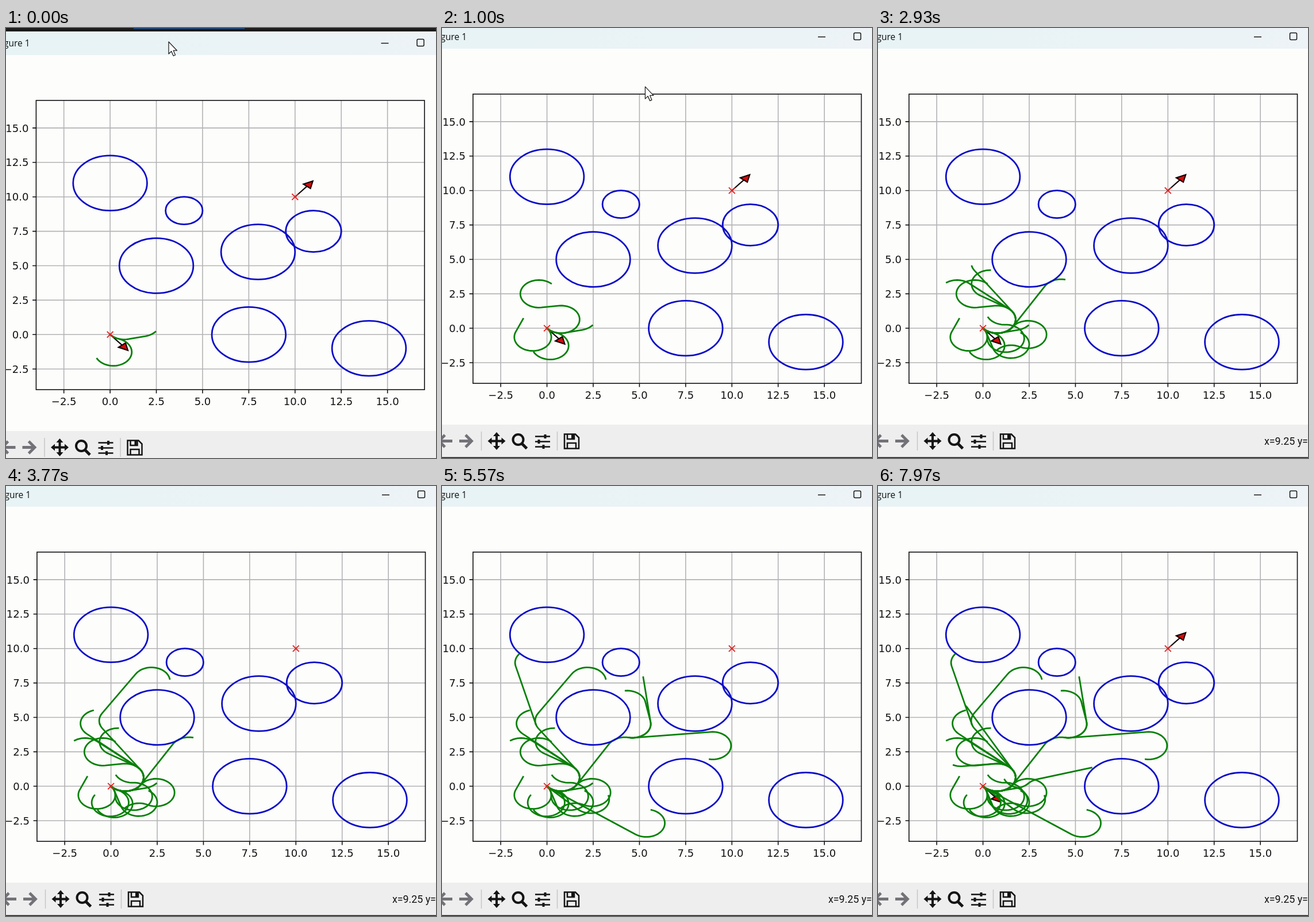
Write an HTML page that moves like this. It is 748x748 px and loops after 8 s.

```html
<!DOCTYPE html>
<html lang="en">
<head>
<meta charset="utf-8">
<title>Curved path planner</title>
<style>
  html, body { margin: 0; width: 100%; height: 100%; overflow: hidden; background: #1b1b1b; }
  svg { display: block; width: 100vw; height: 100vh; }
  .caption { font: 15.5px "Open Sans", sans-serif; fill: #111; text-anchor: end; }
  .readout { font: 17.8px Roboto, sans-serif; fill: #111; }
  .tick { font: 18px "DejaVu Sans", sans-serif; fill: #111; }
  .grid { stroke: #b3b3b5; stroke-width: 1.6; }
  .axis { stroke: #111; stroke-width: 1.6; fill: none; }
  .obstacle { fill: none; stroke: #0d0dc8; stroke-width: 2.8; }
  .edge { fill: none; stroke: #078007; stroke-width: 2.8; stroke-linejoin: round; stroke-linecap: square; }
  .mark { stroke: #f01c1c; stroke-width: 1.9; }
  .arrow { fill: #d90808; stroke: #100; stroke-width: 2.1; }
  .icon { fill: none; stroke: #141414; }
</style>
</head>
<body>
<svg viewBox="0 0 748 748">
  <defs>
    <linearGradient id="bar">
      <stop offset="0" stop-color="#e7f3f5"/><stop offset="1" stop-color="#edf3f7"/>
    </linearGradient>
  </defs>
  <rect width="748" height="748" fill="#1b1b1b"/>
  <rect x="222" width="193" height="1.5" fill="#1d4f91"/>
  <g id="win">
    <rect x="-10" y="-5" width="770" height="42" fill="url(#bar)"/>
    <rect x="-10" y="36" width="770" height="654" fill="#fdfdfc"/>
    <rect x="-10" y="690" width="770" height="56.5" fill="#eeeeee"/>
    <text class="caption" x="43" y="20.5">Figure 1</text>
    <path class="icon" stroke-width="1.5" d="M654 15.5h13"/>
    <rect class="icon" stroke-width="1.5" x="716.5" y="8.5" width="12" height="12" rx="2"/>

    <g id="grid"></g>
    <g id="arrows"></g>
    <g id="edges"></g>
    <g id="obstacles"></g>
    <g id="marks"></g>
    <g id="axes"></g>

    <g class="icon">
      <g stroke="#727278" stroke-width="4.8">
        <path d="M18 718.5H-4M5 708L-5 718.5L5 729"/>
        <path d="M30 718.5H51M41 708L51.5 718.5L41 729"/>
      </g>
      <path stroke="#c4c4c4" stroke-width="1.4" d="M68.5 702v33M200.5 702v33"/>
      <path stroke-width="4" d="M95 709v19M85 718.5h20"/>
      <path stroke="none" fill="#141414" d="M95 703l6 7h-12zM95 734l6-7h-12zM79.5 718.5l7-6v12zM110.5 718.5l-7-6v12z"/>
      <circle cx="132.5" cy="716" r="9" stroke-width="4"/>
      <path stroke-width="5" d="M139 723l8.5 8.5"/>
      <path stroke-width="2.4" d="M162 710.5h26M162 719.5h26M162 728.5h26"/>
      <path stroke-width="4" d="M179.5 707v7M168.5 716v7M176.5 725v7"/>
      <path stroke-width="2.5" d="M213 706.5h19l6 6v19h-25z"/>
      <path stroke-width="2.5" d="M218 707v8h12v-8M218 731v-9h15v9"/>
      <path stroke-width="4" d="M227 707v7"/>
    </g>
    <text class="readout" id="readout" x="672" y="724.5">x=9.25 y=-3.71</text>
    <path id="cursor" fill="#fff" stroke="#222" stroke-width="1.3" stroke-linejoin="round"
      d="M0 0V21L4.7 16.5L8.2 24.5L11.5 23L8.2 15.2H14.5Z"/>
  </g>
</svg>
<script>
const LOOP = 8000, BLINK = 320;
const DEG = Math.PI / 180;
const UNIT_X = 32.17, UNIT_Y = 23.96;
const $ = id => document.getElementById(id);
const px = x => 182.6 + UNIT_X * x;
const py = y => 522.3 - UNIT_Y * y;
const point = ([x, y]) => px(x).toFixed(2) + ' ' + py(y).toFixed(2);

function add(parent, tag, attrs, text) {
  const el = document.createElementNS('http://www.w3.org/2000/svg', tag);
  for (const name in attrs) el.setAttribute(name, attrs[name]);
  if (text) el.textContent = text;
  $(parent).append(el);
  return el;
}

const left = px(-4), right = px(17), upper = py(17), lower = py(-4);
for (let v = -2.5; v <= 15; v += 2.5) {
  const x = px(v), y = py(v), label = v.toFixed(1).replace('-', '\u2212');
  add('grid', 'path', { class: 'grid', d: `M${x} ${upper}V${lower}M${left} ${y}H${right}` });
  add('axes', 'path', { class: 'axis', d: `M${x} ${lower}v6.3M${left} ${y}h-6.3` });
  add('axes', 'text', { class: 'tick', x, y: lower + 27.3, 'text-anchor': 'middle' }, label);
  add('axes', 'text', { class: 'tick', x: left - 13, y: y + 6.6, 'text-anchor': 'end' }, label);
}
add('axes', 'rect', { class: 'axis', x: left, y: upper, width: right - left, height: lower - upper });

const obstacles = [[0, 11, 2], [4, 9, 1], [2.5, 5, 2], [8, 6, 2], [11, 7.5, 1.5], [7.5, 0, 2], [14, -1, 2]];
for (const [x, y, r] of obstacles)
  add('obstacles', 'ellipse', { class: 'obstacle', cx: px(x), cy: py(y), rx: UNIT_X * r, ry: UNIT_Y * r });

// Start and goal: a cross and a heading arrow.
for (const [x, y, yaw] of [[0, 0, -50], [10, 10, 50]]) {
  const c = Math.cos(yaw * DEG), s = Math.sin(yaw * DEG);
  const at = (along, side) => point([x + along * c - side * s, y + along * s + side * c]);
  add('arrows', 'path', { class: 'arrow', d: `M${at(0, 0)}L${at(1, 0)}L${at(1, .25)}L${at(1.5, 0)}L${at(1, -.25)}L${at(1, 0)}Z` });
  add('marks', 'path', { class: 'mark', d: `M${px(x) - 5.4} ${py(y) - 5.4}l10.8 10.8m0 -10.8l-10.8 10.8` });
}

// Unit-radius turns (L/R, degrees) and straights (S, length) from a pose.
function drive(pose, moves) {
  let [x, y, yaw] = pose, d = 'M' + point(pose);
  for (const move of moves.split(' ')) {
    const kind = move[0], amount = +move.slice(1);
    const turn = { L: 1, S: 0, R: -1 }[kind];
    const steps = turn ? Math.ceil(amount / 6) : 1;
    const size = turn ? amount * DEG / steps : amount;
    const chord = turn ? 2 * Math.sin(size / 2) : size;
    for (let i = 0; i < steps; i++) {
      const mid = yaw + turn * size / 2;
      x += chord * Math.cos(mid);
      y += chord * Math.sin(mid);
      yaw += turn * size;
      d += 'L' + point([x, y]);
    }
  }
  return { d, end: [x, y, yaw] };
}

// [time shown, moves, name, parent]
const tree = [
  [0, 'L63 S.95 L36', 'east'],
  [0, 'L32.7 R224'],
  [430, 'R243 S1.02'],
  [750, 'L237.6 S.95 R229'],
  [1070, 'R42.8 L274.8 R64'],
  [1390, 'L106.7 R264 L74'],
  [1390, 'R22.3 S1.19 L218'],
  [1710, 'L198.6 S1.67 R149'],
  [2030, 'L189.4 S2.85 L75'],
  [2350, 'L174.5 S3.62 R20', 'north'],
  [2670, 'L109.5 S3.4 R71', 'middle'],
  [2990, 'L188.6 S3.65 R120'],
  [3310, 'L26.2 R278'],
  [3630, 'R47 S3.4 R138', '', 'north'],
  [3950, 'L108.5 S3.3', '', 'middle'],
  [4270, 'L112.5 S1.45 L84', '', 'middle'],
  [4910, 'S4.35 R56', '', 'north'],
  [4910, 'L17.3 S4.16 R195', '', 'middle'],
  [5230, 'L14.2 S5.68 L200'],
  [5550, 'L5 S2.26 L150'],
  [6190, 'L168.5 S5.2 L10'],
  [6510, 'L236 S1.75 R30'],
  [7150, 'R33 S3.06', '', 'east'],
  [7470, 'R24.8 S.92 L234.8 R47']
];
const poses = { root: [0, 0, -50 * DEG] };
const edges = tree.map(([time, moves, name, parent]) => {
  const { d, end } = drive(poses[parent || 'root'], moves);
  if (name) poses[name] = end;
  return { time, el: add('edges', 'path', { class: 'edge', d }) };
});

const show = (el, on) => el.setAttribute('visibility', on ? 'visible' : 'hidden');
const progress = (t, from, to) => Math.min(1, Math.max(0, (t - from) / (to - from)));

function frame() {
  const t = performance.now() % LOOP;
  const p = progress(t, 30, 270), rest = 1 - p * p * (3 - 2 * p);
  $('win').setAttribute('transform', `translate(${-1.5 * rest} ${11 * rest})`);
  const q = progress(t, 870, 1250);
  $('cursor').setAttribute('transform', `translate(${284.5 + 200 * q} ${13 + 750 * q * q})`);
  show($('cursor'), q < 1);
  show($('readout'), t >= 1070);
  show($('arrows'), (t + 50) % BLINK < BLINK / 2);
  for (const { time, el } of edges) show(el, t >= time);
  requestAnimationFrame(frame);
}
frame();
</script>
</body>
</html>
```
